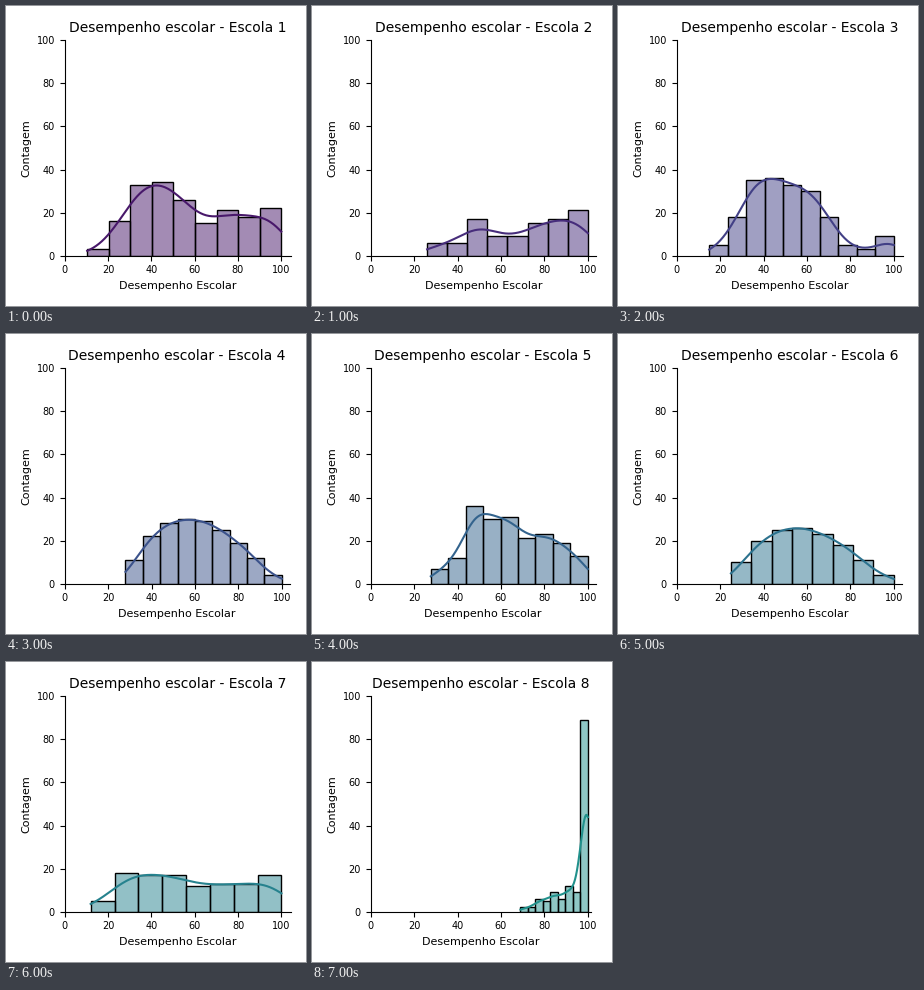
These frames come from a looping animation (300 by 300 pixels, 8 s). A matplotlib script:

```python
import numpy as np
import matplotlib.pyplot as plt
from matplotlib.animation import FuncAnimation

plt.rcParams.update({
    "font.family": "DejaVu Sans",
    "font.size": 10,
    "axes.titlesize": 10,
    "axes.labelsize": 8,
    "xtick.labelsize": 7,
    "ytick.labelsize": 7,
    "axes.spines.top": False,
    "axes.spines.right": False,
})

TOP_SCORE = 100
PALETTE = plt.get_cmap("viridis")(np.linspace(0, 1, 17)[1:-1])


def hump(bins, peak):
    """Counts that rise quickly to a peak and fall off slowly."""
    t = (np.arange(bins) + 0.5) / bins
    return np.round(peak * np.sin(np.pi * t ** 0.75))


# Lowest score and bar heights of each school
SCHOOLS = [
    (10.4, [3, 16, 33, 34, 26, 15, 21, 18, 22]),
    (26, [6, 6, 17, 9, 9, 15, 17, 21]),
    (15, [5, 18, 35, 36, 33, 30, 18, 5, 3, 9]),
    (28, hump(9, 30)),
    (27.7, [7, 12, 36, 30, 31, 21, 23, 19, 13]),
    (25, hump(8, 26)),
    (12, [5, 18, 17, 17, 12, 13, 13, 17]),
    (69, [2, 2, 6, 5, 9, 6, 12, 9, 89]),
]

fig, ax = plt.subplots(figsize=(3, 3), dpi=100)


def mean_scores(edges, counts):
    """Mean score per bin: leans to the fuller side, piles up at the top."""
    width = edges[1] - edges[0]
    slope = np.gradient(counts) / counts
    lean = np.clip(slope / 8, -0.1, 0.1)
    lean[-1] = 0.4 * max(slope[-1], 0)
    return edges[:-1] + width * (0.5 + lean)


def density(x, means, counts, width):
    """Gaussian density estimate (Scott's rule), scaled to bin counts."""
    total = counts.sum()
    mean = np.average(means, weights=counts)
    spread = np.sqrt(np.average((means - mean) ** 2, weights=counts))
    band = spread * total ** -0.2
    z = (x[:, None] - means) / band
    kernel = np.exp(-z ** 2 / 2) / (band * np.sqrt(2 * np.pi))
    return kernel @ counts * width


def draw(i):
    low, counts = SCHOOLS[i]
    counts = np.asarray(counts, float)
    edges = np.linspace(low, TOP_SCORE, len(counts) + 1)
    width = edges[1] - edges[0]
    color = PALETTE[i]

    ax.clear()
    ax.bar(edges[:-1], counts, width, align="edge", linewidth=1,
           facecolor=(*color[:3], 0.5), edgecolor="black")
    x = np.linspace(low, TOP_SCORE, 200)
    y = density(x, mean_scores(edges, counts), counts, width)
    ax.plot(x, y, color=color, linewidth=1.5)

    ax.set_xlim(0, TOP_SCORE + 0.05 * (TOP_SCORE - low))
    ax.set_ylim(0, 100)
    ax.set_xticks(range(0, 101, 20))
    ax.set_yticks(range(0, 101, 20))
    ax.set_title(f"Desempenho escolar - Escola {i + 1}")
    ax.set_xlabel("Desempenho Escolar")
    ax.set_ylabel("Contagem")

    # Same starting margins each time; the second pass settles the layout
    fig.subplots_adjust(left=0.125, right=0.9, bottom=0.11, top=0.88)
    for _ in range(2):
        fig.tight_layout()
    return []


anim = FuncAnimation(fig, draw, frames=len(SCHOOLS), init_func=lambda: [],
                     interval=1000, repeat=True, repeat_delay=0)
plt.show()
```
